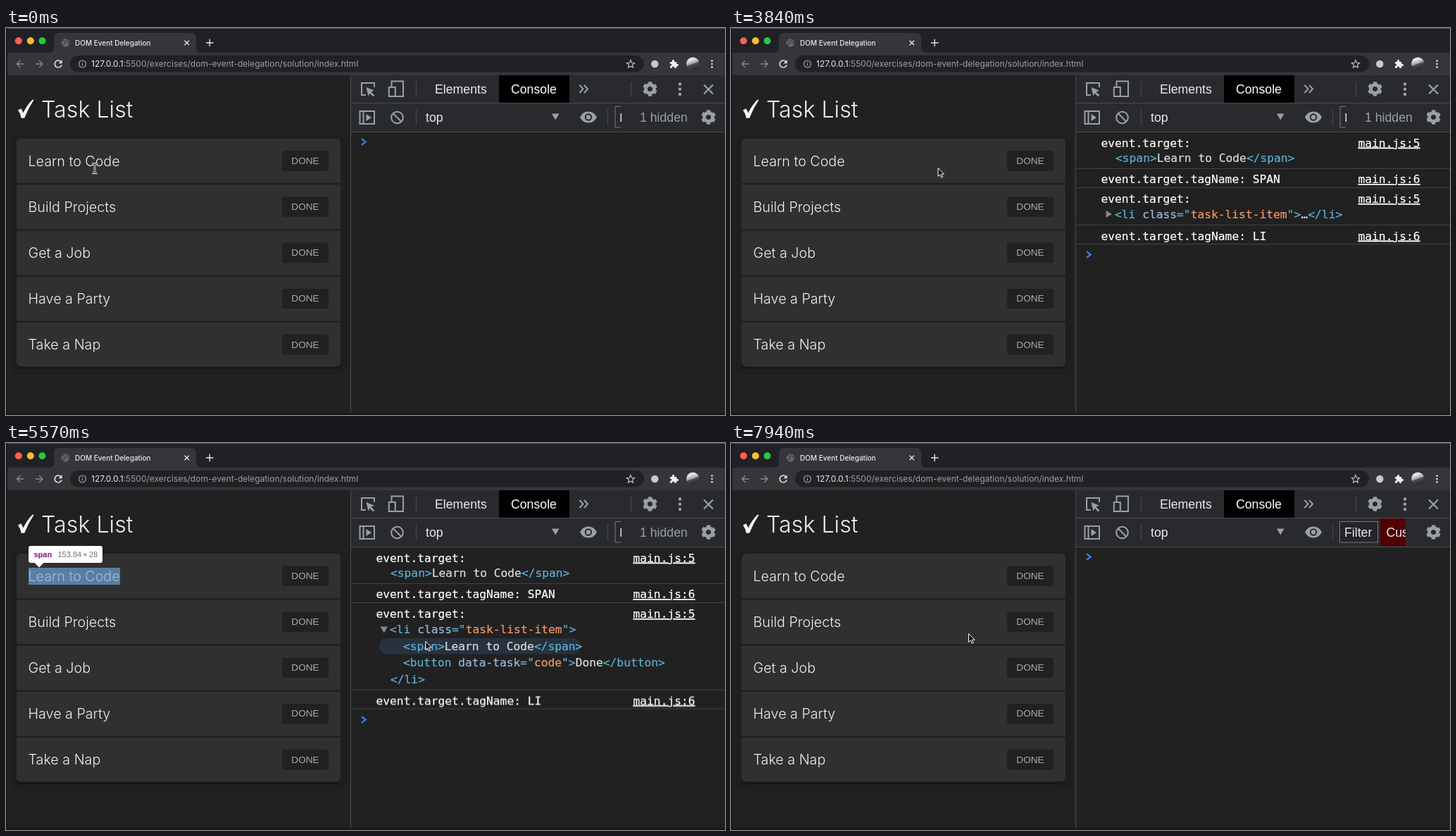
An HTML page for the animation above (8000 ms loop, 1021 by 549 pixels).

```html
<!DOCTYPE html>
<html lang="en">
<head>
<meta charset="utf-8">
<title>DOM Event Delegation</title>
<style>
html, body { margin: 0; width: 100%; height: 100%; overflow: hidden; background: #1a141c; }
svg { display: block; width: 100%; height: 100%; }
text { white-space: pre; }

/* type */
.tab { font: 500 10px Inter, sans-serif; fill: #e8eaed; }
.url { font: 400 12px Inter, sans-serif; fill: #9aa0a6; }
.url tspan { fill: #e8eaed; }
.title { font: 340 32.2px Inter, sans-serif; fill: #f0f0f0; }
.task { font: 340 19.7px Inter, sans-serif; fill: #f0f0f0; }
.done { font: 13.6px "Liberation Sans", Arial, sans-serif; fill: #a9a9a9; text-anchor: middle; }
.ui { font: 17.7px "Liberation Sans", Arial, sans-serif; fill: #e8eaed; }
.log { font: 16.25px "DejaVu Sans Mono", monospace; fill: #fff; stroke: #fff; stroke-width: .2; }
.log .t { fill: #5db0d7; stroke: #5db0d7; }
.log .a { fill: #9bbbdc; stroke: #9bbbdc; }
.log .v { fill: #f29766; stroke: #f29766; }
.log .p { fill: #dcdde0; stroke: #dcdde0; }
.link { text-decoration: underline; }
.tip { font: 11px "Liberation Sans", Arial, sans-serif; fill: #707070; }
.tip rect, .tip path { fill: #fff; }
.tip .n { font-weight: 700; fill: #881280; }
.tip .c { fill: #1a1aa6; }

/* shapes */
.ln { stroke: #494c50; stroke-width: 1; }
.log .ln { stroke: #404347; stroke-width: 1; }
.log .tri { fill: #85888c; stroke: none; }
.ic { fill: none; stroke: #9aa0a6; stroke-width: 2; }
.pill { fill: #28323e; }
.box { fill: rgba(111, 168, 220, .66); }
.pad { fill: rgba(147, 196, 125, .55); fill-rule: evenodd; }
.edge { fill: rgba(255, 229, 153, .66); }

/* timeline */
.on { animation: 8s step-end infinite; }
.caret { animation-name: caret; }
.log1 { animation-name: log1; }
.log2 { animation-name: log2; }
.shut { animation-name: shut; }
.open { animation-name: open; }
.tail { animation-name: tail; }
.prompt { animation-name: prompt; }
.wide { animation-name: wide; }
.slim { animation-name: slim; }
.hSpan1 { animation-name: hSpan1; }
.hSpan2 { animation-name: hSpan2; }
.hSpan { animation-name: hSpan; }
.hLi { animation-name: hLi; }
.hRow { animation-name: hRow; }
.hBtn { animation-name: hBtn; }
.beam { animation-name: beam; }
.arrow { animation-name: arrow; }
.mouse { animation: mouse 8s linear infinite; }

@keyframes caret { 0%, 12.6%, 100% { opacity: 0 } 6.95% { opacity: 1 } }
@keyframes log1 { 0%, 92.83%, 100% { opacity: 0 } 12.6% { opacity: 1 } }
@keyframes log2 { 0%, 92.83%, 100% { opacity: 0 } 47.95% { opacity: 1 } }
@keyframes shut { 0%, 64.08%, 100% { opacity: 0 } 47.95% { opacity: 1 } }
@keyframes open { 0%, 92.83%, 100% { opacity: 0 } 64.08% { opacity: 1 } }
@keyframes tail { 0% { transform: none } 64.08%, 100% { transform: translateY(70.5px) } }
@keyframes prompt {
  0%, 92.83%, 100% { transform: none }
  12.6% { transform: translateY(80px) }
  47.95% { transform: translateY(160px) }
  64.08% { transform: translateY(231px) }
}
@keyframes wide { 0%, 100% { opacity: 0 } 92.83% { opacity: 1 } }
@keyframes slim { 0% { opacity: 1 } 92.83%, 100% { opacity: 0 } }
@keyframes hSpan1 { 0%, 37.3%, 100% { opacity: 0 } 24.8% { opacity: 1 } }
@keyframes hSpan2 { 0%, 75.6%, 100% { opacity: 0 } 67.8% { opacity: 1 } }
@keyframes hSpan { 0%, 37.3%, 75.6%, 100% { opacity: 0 } 24.8%, 67.8% { opacity: 1 } }
@keyframes hLi { 0%, 66.9%, 100% { opacity: 0 } 55% { opacity: 1 } }
@keyframes hRow { 0%, 64.08%, 100% { opacity: 0 } 55% { opacity: 1 } }
@keyframes hBtn { 0%, 83.8%, 100% { opacity: 0 } 76.2% { opacity: 1 } }
@keyframes beam { 0%, 19.8%, 51.4% { opacity: 1 } 18.8%, 24.5%, 54.8%, 100% { opacity: 0 } }
@keyframes arrow { 0%, 19.8%, 51.4% { opacity: 0 } 18.8%, 24.5%, 54.8%, 100% { opacity: 1 } }
@keyframes mouse {
  0%, .9% { transform: translate(126px, 199px) }
  1%, 4% { transform: translate(124.5px, 199px) }
  7%, 18.75% { transform: translate(123.5px, 199px) }
  20% { transform: translate(520px, 232px) }
  21.1%, 22% { transform: translate(762px, 242px) }
  23.75% { transform: translate(720px, 215px) }
  25.6% { transform: translate(640px, 188px) }
  28.4%, 31.6% { transform: translate(578px, 183px) }
  31.7%, 36.2% { transform: translate(582.5px, 183px) }
  38.75% { transform: translate(470px, 200px) }
  41.25% { transform: translate(320px, 204px) }
  43.1%, 49.9% { transform: translate(293.5px, 198px) }
  50.9% { transform: translate(340px, 215px) }
  53.1% { transform: translate(545px, 296px) }
  55.6% { transform: translate(590px, 268px) }
  60.9%, 65.6% { transform: translate(535px, 262px) }
  70.75%, 75.1% { transform: translate(612px, 286px) }
  77.3%, 82.4% { transform: translate(610px, 314.5px) }
  91.75%, 95.8% { transform: translate(556px, 119px) }
  97.5% { transform: translate(430px, 230px) }
  98.75% { transform: translate(330px, 268px) }
  99.2%, 100% { transform: translate(337px, 270px) }
}
</style>
</head>
<body>
<svg viewBox="0 0 1021 549" preserveAspectRatio="none">
  <defs>
    <filter id="soft" x="-10%" y="-10%" width="120%" height="120%"><feGaussianBlur stdDeviation="2.6"/></filter>
    <linearGradient id="face" x2=".35" y2="1">
      <stop offset=".3" stop-color="#e2e2e2"/><stop offset=".55" stop-color="#a5a5a5"/>
      <stop offset=".65" stop-color="#4a4a4a"/><stop offset="1" stop-color="#2c2c2c"/>
    </linearGradient>
    <clipPath id="cut"><rect x="922" y="107" width="36" height="39"/></clipPath>
    <g id="gear">
      <circle r="6" fill="none" stroke="#9aa0a6" stroke-width="4.8"/>
      <circle r="8.7" fill="none" stroke="#9aa0a6" stroke-width="3.2" stroke-dasharray="5 4.11" stroke-dashoffset="-2.05"/>
    </g>
    <g id="btn">
      <rect x="392" y="174.3" width="66" height="28.6" rx="3" fill="#212121"/>
      <text class="done" x="425" y="193">DONE</text>
    </g>
    <path id="bar" d="M-3.5-7Q0-7.2 0-5Q0-7.2 3.5-7M0-5.5V5.5M-3.5 7Q0 7.2 0 5Q0 7.2 3.5 7M-2 3H2"/>
  </defs>

  <!-- browser window -->
  <rect x="2" width="1019" height="546.5" fill="#212121"/>
  <rect x="2" width="1019" height="36" fill="#202124"/>
  <rect x="2" width="1019" height="1" fill="#55575b"/>
  <rect x="2" y="35" width="1019" height="32" fill="#35363a"/>
  <path d="M61 35q7 0 7-7V14q0-7 7-7H263q7 0 7 7V28q0 7 7 7z" fill="#35363a"/>
  <circle cx="17.8" cy="18.3" r="5" fill="#ff5f57"/>
  <circle cx="34.8" cy="18.3" r="5" fill="#febc2e"/>
  <circle cx="51.5" cy="18.3" r="5" fill="#28c840"/>
  <circle cx="84.3" cy="21" r="5.7" fill="#63666b"/>
  <path d="M80 18q3 0 4 2t-2 3-1 2M86 16q-1 2 1 3t2 3" fill="none" stroke="#3c3d41" stroke-width="1.3"/>
  <text class="tab" x="98" y="24.6">DOM Event Delegation</text>
  <g fill="none" stroke="#e2e4e7" stroke-width="1.4">
    <path d="M253.5 17.7l6.5 6.5m0-6.5l-6.5 6.5M284 21h10.5M289.2 15.8v10.4"/>
    <path d="M25.5 51H15.5m4.8-4.8L15.5 51l4.8 4.8M42 51H52m-4.8-4.8L52 51l-4.8 4.8" stroke="#85878b"/>
    <path d="M78 47.7A5 5 0 1 0 79 52.5" stroke-width="1.6"/>
  </g>
  <path d="M79.6 45.3v5h-5z" fill="#e2e4e7"/>
  <rect x="91" y="39" width="815" height="23.5" rx="11.7" fill="#202124"/>
  <circle cx="108.5" cy="51" r="5" class="ic" style="stroke-width:1.2"/>
  <path d="M108.5 50v3.6M108.5 47.8v1.2" class="ic" style="stroke-width:1.3"/>
  <text class="url" x="121" y="55"><tspan>127.0.0.1</tspan>:5500/exercises/dom-event-delegation/solution/index.html</text>
  <path d="M887 45.5l1.6 3.7 4 .4-3 2.7.9 3.9-3.5-2-3.5 2 .9-3.9-3-2.7 4-.4z" fill="none" stroke="#c9cbce" stroke-width="1.1"/>
  <circle cx="921.3" cy="51" r="5.2" fill="#c8cacd"/>
  <path d="M943 48h3q-.6-3 1.5-3t1.5 3h3.2v3q2.8-.6 2.8 1.5t-2.8 1.5v2.8h-3q0-2.3-1.7-2.3t-1.7 2.3h-2.8v-3q2.2 0 2.2-1.6T943 50.8z" fill="#eef0f2"/>
  <circle cx="975.3" cy="50.8" r="9.2" fill="url(#face)"/>
  <g fill="#dfe1e4"><circle cx="1002.5" cy="46.6" r="1.3"/><circle cx="1002.5" cy="51" r="1.3"/><circle cx="1002.5" cy="55.4" r="1.3"/></g>

  <!-- task list -->
  <path d="M17 116.5l4.3-2.2q2.2 3 3.1 6.2q5-10.7 13-18.8h2.3q-8 11.8-13.5 26h-4.5q-1-6-4.7-11.2z" fill="#f4f4f4"/>
  <text class="title" x="50" y="126.5">Task List</text>
  <rect x="11" y="158" width="468" height="329" rx="7" fill="#1a1a1a" filter="url(#soft)"/>
  <rect x="15" y="160" width="460" height="324" rx="6" fill="#171717"/>
  <rect x="15" y="157" width="460" height="323.5" rx="6" fill="#303030"/>
  <path d="M15 221.2H475M15 286.4H475M15 351.6H475M15 416.7H475" stroke="#1f1f1f" stroke-width="2.2"/>
  <g class="task">
    <text x="31.5" y="195.5">Learn to Code</text>
    <text x="31.5" y="260.7">Build Projects</text>
    <text x="31.5" y="325.9">Get a Job</text>
    <text x="31.5" y="391">Have a Party</text>
    <text x="31.5" y="456.2">Take a Nap</text>
  </g>
  <use href="#btn"/><use href="#btn" y="65.2"/><use href="#btn" y="130.3"/><use href="#btn" y="195.4"/><use href="#btn" y="260.5"/>

  <!-- devtools toolbars -->
  <rect x="489" y="67" width="532" height="80" fill="#292a2d"/>
  <rect x="700" y="67" width="100" height="39" fill="#000"/>
  <path class="ln" d="M489.5 67V546.5M489 106.5H1021M489 147.5H1021"/>
  <path class="ln" d="M582.5 76V98M887.5 76V98M582.5 115V138M854.5 115V138"/>
  <path class="ic" d="M511 95h-6V78h18v6"/>
  <path d="M511.5 84l11.5 4.7-4.7 1.9 5 5-1.8 1.8-5-5-2 4.3z" fill="#9aa0a6"/>
  <path class="ic" d="M547.5 83V75.5H564V97H554"/>
  <rect class="ic" x="543.8" y="84" width="9" height="13"/>
  <g class="ui">
    <text x="609" y="93">Elements</text>
    <text x="717" y="93" style="fill:#fff">Console</text>
    <text x="596" y="133">top</text>
  </g>
  <path class="ic" d="M814.5 81l5 5.5-5 5.5M821 81l5 5.5-5 5.5"/>
  <use href="#gear" x="914.5" y="86.5"/>
  <use href="#gear" x="997.5" y="126.5"/>
  <g fill="#9aa0a6"><circle cx="957" cy="79.5" r="2.2"/><circle cx="957" cy="86.8" r="2.2"/><circle cx="957" cy="94" r="2.2"/></g>
  <path class="ic" d="M991 80.5l13 13m0-13l-13 13" style="stroke-width:2.2"/>
  <path class="ic" d="M502.5 118H523V136H502.5zM507.5 118v18"/>
  <path d="M511.5 122l7.5 5-7.5 5zM775 121.5h10.5l-5.2 9z" fill="#9aa0a6"/>
  <circle class="ic" cx="555.5" cy="127" r="8.3"/>
  <path class="ic" d="M549.8 121.3l11.4 11.4"/>
  <path d="M815 126.5q4-8 12-8t12 8q-4 8-12 8t-12-8z" fill="#9aa0a6"/>
  <circle cx="827" cy="126.5" r="4.2" fill="#9aa0a6" stroke="#292a2d" stroke-width="2"/>
  <g class="on slim">
    <path d="M873 111.5H865V141H873" fill="none" stroke="#777a7f"/>
    <rect x="872.5" y="121" width="1.6" height="12" fill="#d8dadd"/>
    <text class="ui" x="900" y="133" style="fill:#9aa0a6">1 hidden</text>
  </g>
  <g class="on wide">
    <rect x="864.5" y="111.5" width="54" height="29.5" fill="#242528" stroke="#777a7f"/>
    <text class="ui" x="871" y="133">Filter</text>
    <g clip-path="url(#cut)">
      <rect x="922" y="107" width="36" height="39" fill="#500000"/>
      <text class="ui" x="930.5" y="133">Custom</text>
    </g>
  </g>

  <!-- console -->
  <g class="pill">
    <rect class="on hSpan1" x="530" y="173" width="270" height="22.5" rx="11"/>
    <rect class="on hRow" x="530" y="253.5" width="336" height="22.5" rx="11"/>
    <rect class="on hSpan2" x="530" y="277" width="286" height="22.5" rx="11"/>
    <rect class="on hBtn" x="530" y="300.5" width="402" height="22.5" rx="11"/>
  </g>
  <g class="log">
    <g class="on log1">
      <text x="525.5" y="168.5">event.target:</text>
      <text class="link" x="890.5" y="168.5">main.js:5</text>
      <text class="p" x="546" y="190"><tspan class="t">&lt;span&gt;</tspan>Learn to Code<tspan class="t">&lt;/span&gt;</tspan></text>
      <path class="ln" d="M490 199.5H1021M490 226.5H1021"/>
      <text x="525.5" y="220.2">event.target.tagName: SPAN</text>
      <text class="link" x="890.5" y="220.2">main.js:6</text>
    </g>
    <g class="on log2">
      <text x="525.5" y="248">event.target:</text>
      <text class="link" x="890.5" y="248">main.js:5</text>
      <text class="t" x="545" y="270">&lt;li <tspan class="a">class</tspan>="<tspan class="v">task-list-item</tspan>"&gt;</text>
      <g class="on tail">
        <path class="ln" d="M490 279.5H1021M490 306.5H1021"/>
        <text x="525.5" y="300.5">event.target.tagName: LI</text>
        <text class="link" x="890.5" y="300.5">main.js:6</text>
      </g>
    </g>
    <g class="on shut">
      <path class="tri" d="M532.5 259l8.5 5-8.5 5z"/>
      <text class="p" x="809.5" y="270">…<tspan class="t">&lt;/li&gt;</tspan></text>
    </g>
    <g class="on open">
      <path class="tri" d="M531.5 260.5h10.5l-5.2 9z"/>
      <path class="ln on hLi" d="M537 276V346"/>
      <text class="p" x="564" y="293.7"><tspan class="t">&lt;span&gt;</tspan>Learn to Code<tspan class="t">&lt;/span&gt;</tspan></text>
      <text class="p" x="564" y="317.3"><tspan class="t">&lt;button <tspan class="a">data-task</tspan>="<tspan class="v">code</tspan>"&gt;</tspan>Done<tspan class="t">&lt;/button&gt;</tspan></text>
      <text class="t" x="546" y="340.5">&lt;/li&gt;</text>
    </g>
  </g>
  <path class="on prompt" d="M505 157.2l5.5 4.3-5.5 4.3" fill="none" stroke="#3a84f2" stroke-width="2.2"/>
  <rect class="on caret" x="525.5" y="152" width="1.2" height="18" fill="#e8eaed"/>

  <!-- inspector highlights -->
  <g class="on hSpan">
    <rect class="box" x="32" y="177" width="130" height="24"/>
    <g class="tip">
      <rect x="32" y="146" width="105" height="24" rx="3"/>
      <path d="M40 169.5h14l-7 7z"/>
      <text class="n" x="39.5" y="162.3">span</text>
      <text x="73.5" y="162.3">153.84&#8201;×&#8201;28</text>
    </g>
  </g>
  <g class="on hLi">
    <path class="pad" d="M15 157H475V220.2H15zM32 174V203H458V174z"/>
    <rect class="box" x="32" y="174" width="426" height="29"/>
    <rect class="edge" x="15" y="220.2" width="460" height="2"/>
    <g class="tip">
      <rect x="15" y="127" width="143" height="23.5" rx="3"/>
      <path d="M24 150h14l-7 7z"/>
      <text class="n" x="23" y="143">li<tspan class="c">.task-list-item</tspan></text>
      <text x="109.5" y="143">544&#8201;×&#8201;77</text>
    </g>
  </g>
  <g class="on hBtn">
    <path class="pad" d="M392 174.3H458V203H392zM405 180.5V196.5H444.5V180.5z"/>
    <rect class="box" x="405" y="180.5" width="39.5" height="16"/>
    <g class="tip">
      <rect x="379" y="144" width="108" height="23.5" rx="3"/>
      <path d="M401 167h14l-7 7z"/>
      <text class="n" x="387" y="160">button</text>
      <text x="430" y="160">78.23&#8201;×&#8201;34</text>
    </g>
  </g>

  <!-- pointer -->
  <g class="mouse">
    <g class="on beam" fill="none">
      <use href="#bar" stroke="#fff" stroke-width="2.6"/>
      <use href="#bar" stroke="#111"/>
    </g>
    <path class="on arrow" d="M.5.5V12.5L3.3 9.9 5.3 14.3 7.3 13.4 5.3 9.2H9z" fill="#111" stroke="#fff"/>
  </g>
</svg>
</body>
</html>
```
